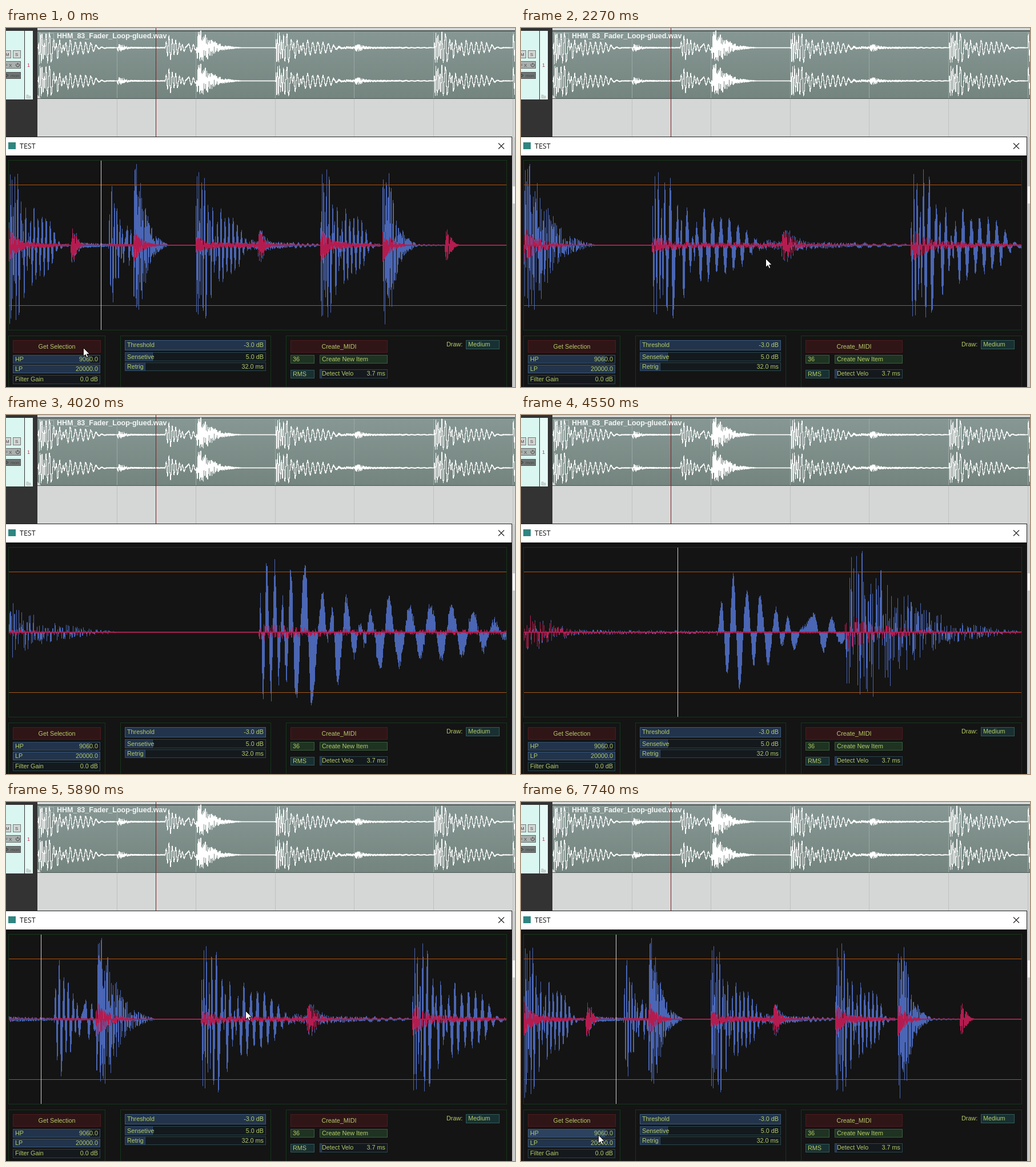
Write an HTML page with a canvas that moves like this. It is 891x628 px and loops after 8000 ms.

```html
<!DOCTYPE html>
<html lang="en">
<head>
<meta charset="utf-8">
<title>Drum trigger</title>
<style>
html, body { margin: 0; width: 100%; height: 100%; overflow: hidden; background: #141414; }
canvas, svg { position: absolute; left: 0; top: 0; width: 891px; height: 628px; }
text { font: 10.8px "Liberation Sans", Arial, sans-serif; fill: #b5cc68; white-space: pre; }
.end { text-anchor: end; }
.mid { text-anchor: middle; }
.title { font: 12.5px "Open Sans", "Noto Sans", sans-serif; fill: #111; }
.clip { font-weight: bold; font-size: 12.5px; fill: #f4f7f6; }
.tiny { font-size: 8px; fill: #444; }
.hover { fill: #6fa0e0; opacity: 0; }
</style>
</head>
<body>
<canvas id="cv" width="891" height="628"></canvas>
<svg id="ui" viewBox="0 0 891 628" shape-rendering="crispEdges"></svg>
<script>
const ctx = document.getElementById('cv').getContext('2d');
const ui = document.getElementById('ui');

// ---- audio model: positions in pixels of the unzoomed view ----
const LEN = 873, BEAT = LEN / 8, RES = 5, MAXZ = 1.2 ** 9;
let seed = 20483;
function rnd() {
  seed = (seed + 0x6D2B79F5) | 0;
  let t = Math.imul(seed ^ (seed >>> 15), 1 | seed);
  t = (t + Math.imul(t ^ (t >>> 7), 61 | t)) ^ t;
  return ((t ^ (t >>> 14)) >>> 0) / 2147483648 - 1;
}

// Interpolates through flat x,y pairs, optionally with a cosine ease.
function curve(p, x, smooth) {
  if (x <= p[0] || x >= p[p.length - 2]) return 0;
  let i = 2;
  while (p[i] < x) i += 2;
  let k = (x - p[i - 2]) / (p[i] - p[i - 2]);
  if (smooth) k = (1 - Math.cos(Math.PI * k)) / 2;
  return p[i - 1] + (p[i + 1] - p[i - 1]) * k;
}

const KICK = [0, 0, 3, 62, 8, -118, 14, 113, 21, -115, 28, 121, 35, -80, 42, 65, 48, -78,
  56, 115, 65, -118, 81, 115, 92, -119, 112, 66, 120, -12, 129, 40, 138, -88, 153, 58,
  167, -43, 178, 16, 185, -22, 195, 37, 213, -63, 228, 61, 245, -58, 265, 45, 283, -45,
  301, 45, 320, -47, 338, 45, 356, -42, 375, 38, 393, -32, 411, 20, 432, -10, 452, 5, 472, -4, 492, 0];
const TOM = [0, 0, 1.6, 52, 3.4, -70, 5.4, 98, 7.6, -98, 10, 72, 12.4, -56, 14.6, 65, 17.2, -55,
  20, 40, 22, -22, 24, 28, 26, -30, 29, 8, 33, 30, 36, -32, 39, 25, 41.5, -18, 45, 0];
const SNARE = [0, 128, 14, 118, 18, 80, 28, 40, 37, 18, 51, 7, 62, 0];

const N = LEN * RES, raw = new Float32Array(N), high = new Float32Array(N);

function add(at, span, low, hiss, treble) {
  const from = Math.round(at * RES);
  for (let i = from; i < Math.min(N, from + span * RES); i++) {
    const t = (i - from) / RES, h = treble(t) * rnd();
    high[i] += h;
    raw[i] += low(t) + h + hiss(t) * rnd();
  }
}
const none = () => 0;
const beat = n => n * BEAT + 0.7;
const kick = t => curve(KICK, t * MAXZ, true);
const body = t => Math.min(6, 3 + Math.abs(kick(t)) * 0.08);
const hatEnv = t => (t < 1 ? 0.6 : 1) * 30 * Math.exp(-((t / 12) ** 2));
const wobble = t => 3 * Math.exp(-t / 60) * Math.sin(t * 0.75);

for (const n of [0, 5])
  add(beat(n), 105, kick, t => t < 85 ? body(t) : 2, t => 28 * Math.exp(-t / 15) + (t < 85 ? 3 : 1));
add(beat(3), BEAT, kick, t => t < 80 ? body(t) : 6, t => 13 * Math.exp(-t / 14) + 4);
add(beat(1), 66, none, t => 6 * Math.exp(-t / 70), hatEnv);
add(beat(4), 106, t => t > 60 ? wobble(t - 60) : 0, t => 10 * Math.exp(-t / 55), t => hatEnv(t) * 0.85 + 2 * Math.exp(-t / 50));
add(beat(7), 24, none, none, hatEnv);
add(175.5, 45, t => curve(TOM, t, true), t => 4, t => 1.5);
for (const n of [2, 6])
  add(beat(n), n > 2 ? 106 : 64, t => n > 2 && t > 45 ? wobble(t - 45) * 0.7 : 0,
    t => curve(SNARE, t + 0.01), t => 34 * Math.exp(-t / 13) * (t < 40 ? 1 : 0.3));

// Peaks of every pixel column as thin bars around the axis y.
function drawWave(data, color, x0, x1, y, off, zoom, gain, thin, fromAxis) {
  ctx.fillStyle = color;
  for (let x = x0; x < x1; x++) {
    const a = Math.max(0, Math.floor(((x - x0) / zoom + off) * RES) - (fromAxis ? 0 : 1));
    const b = Math.min(N, Math.max(a + 1, Math.floor(((x - x0 + 1) / zoom + off) * RES)));
    let lo = fromAxis ? 0 : 1e9, hi = fromAxis ? 0 : -1e9;
    for (let i = a; i < b; i++) {
      if (data[i] < lo) lo = data[i];
      if (data[i] > hi) hi = data[i];
    }
    ctx.fillRect(x, y - hi * gain - thin, 1, (hi - lo) * gain + 2 * thin);
  }
}

function rect(x, y, w, h, c) { ctx.fillStyle = c; ctx.fillRect(x, y, w, h); }

function drawArrange() {
  rect(0, 0, 891, 191, '#d5d7d6');
  const g = ctx.createLinearGradient(0, 5, 0, 123);
  g.addColorStop(0, '#879894');
  g.addColorStop(1, '#74847f');
  rect(55, 4, 836, 120, '#4c5855');
  rect(55, 6, 836, 117, g);
  for (let i = 1; i < 7; i++) {
    const x = Math.round(55 + i * 138.6);
    rect(x, 6, 1, 117, '#9aa8a4');
    rect(x, 124, 1, 66, '#bfc1c0');
  }
  for (const y of [34.5, 92.5]) drawWave(raw, '#fff', 55, 891, y, 0, 1.27, 0.205, 0.8, false);
  rect(262, 0, 1, 190, '#7c1f24');
}

function drawView(off, zoom) {
  rect(4, 231, 873, 298, '#141414');
  drawWave(raw, '#4a66b4', 4, 877, 380, off, zoom, 1, 0.5, true);
  drawWave(high, '#b41c50', 4, 877, 380, off, zoom, 1, 0.9, true);
  rect(4, 274, 873, 1, '#b54f08');
  rect(4, 485, 873, 1, '#a3541a');
  const line = Math.round(4 + (162.5 - off) * zoom - 0.5);
  if (line >= 4 && line < 877) rect(line, 231, 1, 298, '#d0d0d0');
  ctx.strokeStyle = '#15361a';
  ctx.strokeRect(4.5, 231.5, 872, 297);
}

// ---- static interface ----
let out = '';
const fill = (x, y, w, h, c) => out += `<rect x="${x}" y="${y}" width="${w}" height="${h}" fill="${c}"/>`;
const box = (x, y, w, h, c, s) =>
  out += `<rect x="${x + .5}" y="${y + .5}" width="${w - 1}" height="${h - 1}" fill="${c}" stroke="${s}"/>`;
const label = (x, y, s, cls = '') => out += `<text x="${x}" y="${y}" class="${cls}">${s}</text>`;
const path = (d, stroke, w = 1, f = 'none') =>
  out += `<path d="${d}" fill="${f}" stroke="${stroke}" stroke-width="${w}" shape-rendering="auto"/>`;

function slider(x, y, w, h, part, name, value, base) {
  box(x, y, w, h, '#14191d', '#28464c');
  if (part) box(x, y, w * part, h, '#22344c', '#2f4a68');
  if (part > 0.9) box(x, y, w, h, 'none', '#3c5c80');
  label(x + 4, base, name);
  label(x + w - 4, base, value, 'end');
}
function button(x, y, w, h, c, s, name, base, center) {
  box(x, y, w, h, c, s);
  label(center ? x + w / 2 : x + 4, base, name, center ? 'mid' : '');
}

// track panel
fill(0, 0, 55, 191, '#333');
fill(0, 5, 32, 120, '#d9f7f0');
fill(33, 5, 14, 120, '#e6faf6');
box(-3, 39, 12, 14, '#d2d6d4', '#777');
label(-1, 49, 'M', 'tiny');
box(12, 39, 14, 14, '#d2d6d4', '#777');
label(16, 49, 'S', 'tiny');
box(-3, 58, 29, 13, '#a9b0ae', '#666');
label(-2, 68, 'F X', 'tiny');
path('M18.6 62.5a3 3 0 1 0 3.8 0M20.5 61v3.5', '#333');
box(-3, 77, 29, 12, '#6d7573', '#555');
path('M0 80l4 3l-4 3z', '#333');
label(8, 86, 'mon', 'tiny');
out += '<text x="37" y="68" style="font-size:9px;fill:#c03358">1</text>';
path('M36 117h3v2h4v4h-7z', '#b9c8c4', 1, '#c9d6d2');
// clip header
for (const x of [61, 73]) box(x, 9, 11, 10, 'none', '#a9b5b2');
label(89, 18, 'HHM_83_Fader_Loop-glued.wav', 'clip');
path('M55 117l6 6h-6z', 'none', 1, '#d5d7d6');

// window
fill(0, 190, 886, 438, '#222');
fill(0, 191, 885, 32, '#fff');
fill(4, 200, 13, 12, '#2f8580');
label(24, 211, 'TEST', 'title');
path('M862 201.500l10 10m0-10l-10 10', '#222', 1.1);
fill(0, 223, 885, 405, '#141414');
fill(886, 191, 5, 437, '#c9cbca');
fill(887, 277, 4, 30, '#f4f4f4');
// hole through which the canvas shows
const holeStart = out.length;

box(4, 538, 170, 100, 'none', '#15361a');
box(200, 538, 264, 100, 'none', '#15361a');
box(490, 538, 387, 100, 'none', '#15361a');

const RED = ['#301517', '#4c1b1d'], GREEN = ['#1f3322', '#3a5c3c'], TEAL = ['#193032', '#2f5a58'];
button(12, 546, 154, 22, ...RED, 'Get Selection', 561, true);
slider(12, 572, 153, 15, 0.885, 'HP', '9060.0', 583);
box(12, 572, 153, 15, 'none', '#36526f');
slider(12, 589, 153, 15, 1, 'LP', '20000.0', 600);
slider(12, 607, 153, 16, 0, 'Filter Gain', '0.0 dB', 618);
slider(208, 546, 247, 18, 1, 'Threshold', '-3.0 dB', 558);
slider(208, 567, 247, 16, 0.2, 'Sensetive', '5.0 dB', 579);
slider(208, 585, 247, 15, 0.147, 'Retrig', '32.0 ms', 596);
button(498, 546, 170, 22, ...RED, 'Create_MIDI', 561, true);
button(498, 572, 42, 15, ...GREEN, '36', 583);
button(549, 572, 119, 15, ...GREEN, 'Create New Item', 583);
button(498, 598, 42, 15, ...TEAL, 'RMS', 609);
slider(549, 597, 119, 16, 0.035, 'Detect Velo', '3.7 ms', 608);
label(771, 557, 'Draw:');
button(805, 546, 59, 16, ...TEAL, 'Medium', 557);
[[607, 16], [589, 15], [572, 15]].forEach(([y, h]) =>
  out += `<rect class="hover" x="12" y="${y}" width="153" height="${h}"/>`);
out += '<path id="arrow" d="M.5 .5V15.500L4 12.200L6.400 17.500L8.800 16.400L6.500 11.300H11.200Z" ' +
  'fill="#fff" stroke="#000" stroke-width=".9" shape-rendering="auto"/>';

// Backgrounds sit under the wave view; the window is cut out with a clip.
ui.innerHTML = '<clipPath id="cut"><path clip-rule="evenodd" d="M0 0H891V628H0ZM4 231V529H877V231Z"/></clipPath>' +
  '<g clip-path="url(#cut)">' + out.slice(0, holeStart) + '</g>' + out.slice(holeStart);
const arrow = document.getElementById('arrow');
const hovers = ui.querySelectorAll('.hover');

// ---- timeline ----
const OUT = MAXZ * 0.8 ** 5;
const views = [ // start, offset, zoom
  [0, 0, 1], [2270, 219.6, 1.2 ** 4], [2770, 341.9, MAXZ], [3520, 341.7, MAXZ], [3770, 300, MAXZ],
  [4020, 243.2, MAXZ], [4300, 150, MAXZ], [4550, 110, MAXZ], [4830, 155, MAXZ],
  [5080, 286.2, MAXZ], [5360, 292.8, MAXZ], [5890, 128.4, OUT], [6410, 0, 1]];
const moves = [ // start, x, y
  [0, 135, 559], [500, 247, 481], [750, 372, 383], [1260, 257, 409], [1520, 79, 356],
  [1770, 428, 403], [3020, 256, 365], [3270, 199, 371], [3520, 247, 373], [3770, 462, 376],
  [4020, -50, 0], [5080, 455, 385], [5360, 451, 373], [5610, 421, 373], [5890, 419, 365],
  [6410, 381, 374], [6910, 373, 377], [7200, 137, 606], [7480, 135, 589], [7740, 135, 582]];
const last = (list, t) => list.findLast(k => k[0] <= t);

let shown;
function frame(now) {
  const t = now % 8000, view = last(views, t);
  if (view !== shown) {
    drawView(view[1], view[2]);
    shown = view;
  }
  const [, x, y] = last(moves, t);
  arrow.setAttribute('transform', `translate(${x} ${y})`);
  const over = t < 7200 ? -1 : t < 7480 ? 0 : t < 7740 ? 1 : 2;
  hovers.forEach((h, i) => h.style.opacity = i === over ? 0.13 : 0);
  requestAnimationFrame(frame);
}
drawArrange();
const start = performance.now();
requestAnimationFrame(now => frame(Math.max(0, now - start)));
(function loop() {
  const tick = frame;
  frame = now => tick(now);
})();
</script>
</body>
</html>
```
